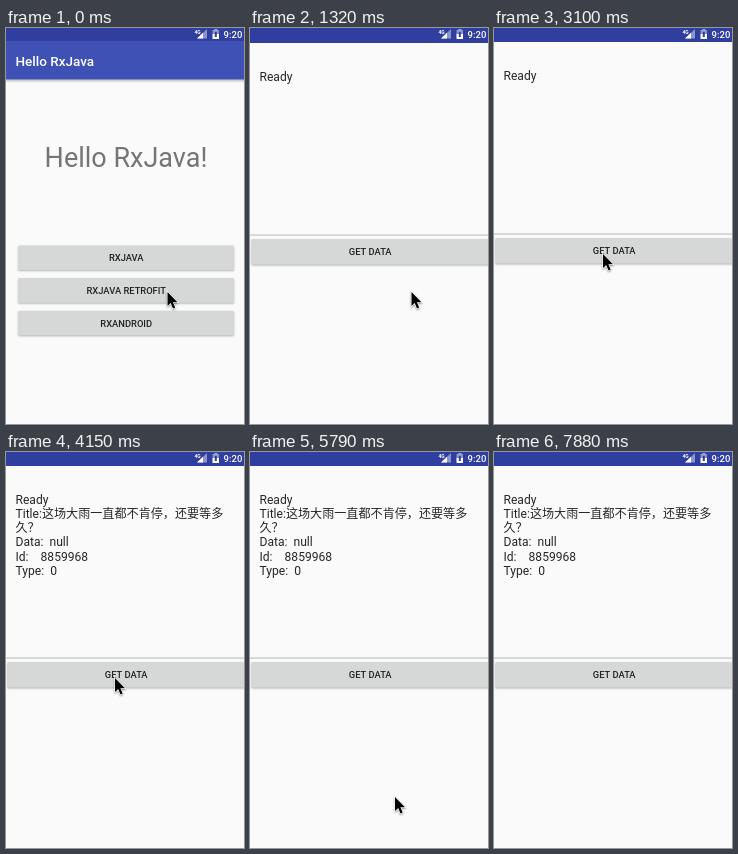
Write an HTML page with a canvas that moves like this. It is 238 px wide and 396 px high and loops after 8640 ms.

```html
<!DOCTYPE html>
<html lang="en">
<head>
<meta charset="utf-8">
<title>Android demo</title>
<style>
html, body { margin: 0; width: 100%; height: 100%; overflow: hidden; background: #fafafa; }
canvas { display: block; width: 238px; height: 396px; }
</style>
</head>
<body>
<canvas id="stage" width="238" height="396"></canvas>
<script>
const ctx = document.getElementById('stage').getContext('2d');
const LOOP = 8640, STEP = 146;
const FONT = 'Roboto, "Noto Sans CJK SC", "Noto Sans CJK", sans-serif';
const INK = '#272727', BUTTON = '#d6d7d7', PRESSED = '#cdcece';

const RESULT = ['Ready', 'Title:这场大雨一直都不肯停，还要等多', '久？', 'Data:  null', 'Id:    8859968', 'Type:  0'];

// Pointer stops; each move bends through a control point
const home = [161, 263.5], rest = [169, 339], click = [108.5, 225.5], low = [144.5, 344.5], exit = [159, 376];
const mid = (a, b) => a.map((v, i) => (v + b[i]) / 2);
const moves = [
  { start: 1770, steps: 2, path: [home, mid(home, rest), rest] },
  { start: 2370, steps: 6, path: [rest, [80, 275], click] },
  { start: 5200, steps: 5, path: [click, mid(click, low), low] },
  { start: 7430, steps: 4, path: [low, mid(low, exit), exit] }
];

function pointerAt(t) {
  const move = moves.findLast(m => m.start <= t);
  if (!move) return home;
  const u = Math.min(1, (Math.floor((t - move.start) / STEP) + 1) / move.steps);
  const [a, b, c] = move.path;
  return a.map((v, i) => (1 - u) ** 2 * v + 2 * u * (1 - u) * b[i] + u * u * c[i]);
}

function rect(x, y, w, h, color) {
  ctx.fillStyle = color;
  ctx.fillRect(x, y, w, h);
}

function text(str, x, y, size, color = INK, weight = 400, align = 'left') {
  ctx.font = `${weight} ${size}px ${FONT}`;
  ctx.textAlign = align;
  ctx.fillStyle = color;
  ctx.fillText(str, x, y);
}

function shape(points, color) {
  ctx.beginPath();
  points.forEach(([x, y]) => ctx.lineTo(x, y));
  ctx.closePath();
  ctx.fillStyle = color;
  ctx.fill();
}

function setShadow(alpha, blur, y) {
  ctx.shadowColor = `rgba(0,0,0,${alpha})`;
  ctx.shadowBlur = blur;
  ctx.shadowOffsetY = y;
}

function button(label, x, y, w, h, pressed, ripple) {
  ctx.save();
  setShadow(.28, pressed ? 4 : 2, pressed ? 1.5 : 1);
  ctx.beginPath();
  ctx.roundRect(x, y, w, h, 1.3);
  ctx.fillStyle = ripple ? PRESSED : BUTTON;
  ctx.fill();
  ctx.restore();
  if (ripple) rect(116, y, 72, h, '#c8c9c9');
  text(label, 120.2, y + h / 2 + 3.5, 9.35, '#212121', 500, 'center');
}

function statusBar(height) {
  rect(0, 0, 238, height, '#303f9f');
  text('4G', 188.5, 5.5, 5, '#fff', 700);
  shape([[191, 10.5], [201, 10.5], [201, 1]], '#8c95cb');
  shape([[191, 10.5], [197, 10.5], [197, 4.8]], '#fff');
  rect(208.2, 1, 3.2, 1.5, '#a9b0d8');
  rect(206.5, 2, 6.5, 4, '#8c95cb');
  rect(206.5, 6, 6.5, 5, '#fff');
  rect(208.8, 4, 2, 5, '#303f9f');
  text('9:20', 217.6, 10, 9.5, '#fff', 500);
}

function homeScreen(t) {
  rect(0, 13, 238, 38.5, '#3f51b5');
  const shade = ctx.createLinearGradient(0, 51, 0, 55);
  shade.addColorStop(0, 'rgba(0,0,0,.28)');
  shade.addColorStop(1, 'rgba(0,0,0,0)');
  rect(0, 51.5, 238, 3.5, shade);
  statusBar(13);
  text('Hello RxJava', 9.5, 37.8, 13.5, '#fff', 500);
  text('Hello RxJava!', 120, 138.5, 27, '#757575', 400, 'center');
  ['RXJAVA', 'RXJAVA RETROFIT', 'RXANDROID'].forEach((label, i) => {
    const active = i === 1;
    button(label, 12.2, 217.5 + i * 32.6, 215.8, 24.6, active && t >= 140, active && t >= 1180);
  });
}

function dataScreen(t) {
  const dy = t < 1470 ? 1 : 0;
  statusBar(14 + dy);
  ctx.save();
  ctx.translate(0, dy);
  rect(0, 205.3, 238, 1.5, '#cdcdcd');
  button('GET DATA', 1.4, 210, 239, 25.6, t >= 3400 && t < 3850);
  RESULT.slice(0, t < 3700 ? 1 : RESULT.length)
    .forEach((line, i) => text(line, 9.5, 51.8 + i * 14.18, 12.1));
  ctx.restore();
}

function drawPointer(t) {
  if (t >= 7880) return;
  ctx.save();
  ctx.translate(...pointerAt(t));
  const arrow = [[0.5, 0.5], [0.5, 14.5], [3.7, 11.5], [6, 17], [8.2, 16], [5.9, 10.8], [10.5, 10.8]];
  setShadow(.3, 2, 1);
  shape(arrow, '#fff');
  ctx.lineWidth = 1.4;
  ctx.strokeStyle = '#fff';
  ctx.stroke();
  ctx.shadowColor = 'transparent';
  shape(arrow, '#000');
  ctx.restore();
}

function draw(t) {
  rect(0, 0, 238, 396, '#fafafa');
  (t < 1320 ? homeScreen : dataScreen)(t);
  drawPointer(t);
}

const start = performance.now();
function tick() {
  draw((performance.now() - start) % LOOP);
  requestAnimationFrame(tick);
}
tick();
</script>
</body>
</html>
```
